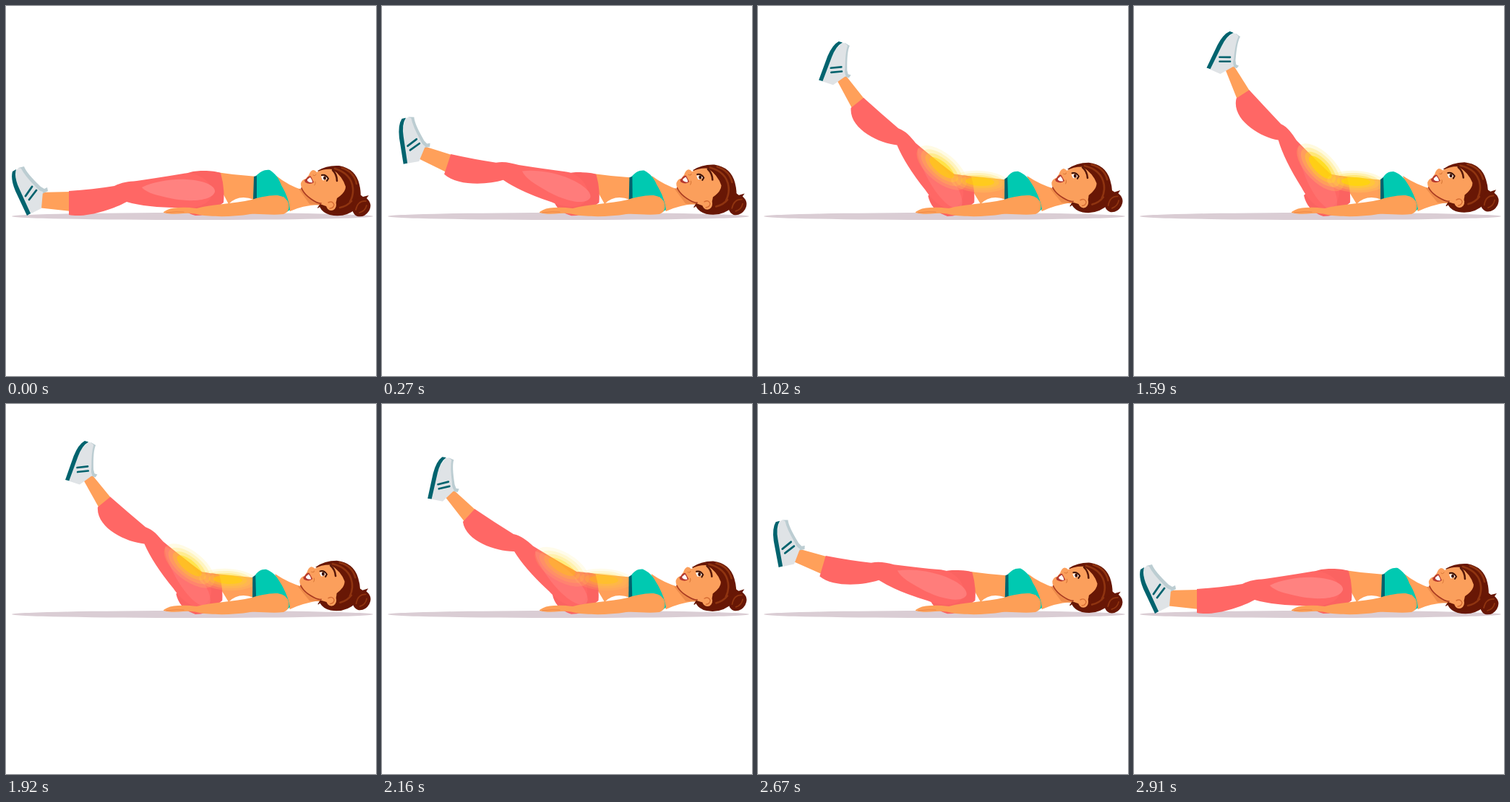
An HTML page that plays this animation: 512 px wide and 512 px high, repeating every 3.6 s.

```html
<!DOCTYPE html>
<html lang="en">
<head>
<meta charset="utf-8">
<title>Leg raise</title>
<style>
html, body { margin: 0; width: 100%; height: 100%; overflow: hidden; background: #fff; }
svg { display: block; width: 100vw; height: 100vh; }
.skin { fill: #ffa05a; }
.arm { fill: #fd9f57; }
.coral { fill: #ff6765; }
.hair { fill: #681705; }
.teal { fill: #00c9b1; }
.navy { fill: #00636e; }
.line { fill: none; stroke-linecap: round; }
</style>
</head>
<body>
<svg viewBox="0 0 512 512">
  <ellipse cx="258" cy="291" rx="250" ry="5" fill="#dacdd4"/>

  <path class="skin" data-to="M284 235Q316 238 345 241L343 268Q322 260 308 274Z"
    d="M284 229Q316 234 347 236L343 268Q322 260 308 274Z"/>
  <path fill="#fb6361"
    data-to="M268 232C274 233 280 234 284 235C288 235 292 236 295 237Q300 254 299 272L284 284Q278 291 262 291Q240 284 235 262Z"
    d="M243 235C252 229 264 228 274 228C284 228 291 229 297 231Q303 252 301 272L284 284Q278 290 262 290Q240 284 238 268Z"/>

  <g id="leg">
    <path class="skin" data-to="M42 268L90 268L90 289L42 280Z" d="M44 258L90 257L90 284L44 279Z"/>
    <g id="shoe">
      <path fill="#bccdd2" d="M17 224L25 222Q28 231 48 250L53 253L57 251L58 256L46 262Z"/>
      <path fill="#dfe3e6" data-to="M14 227Q18 223 23 224Q28 234 44 250Q48 256 53 257L49 280L33 288L14 249Z"
        d="M14 227Q18 223 21 225Q26 235 41 250Q47 257 51 257L49 280L33 288L14 249Z"/>
      <path class="navy" d="M9 229L14 226Q11 237 18 252L34 287L29 290L13 256Q6 239 9 229Z"/>
      <path class="line" stroke="#00636e" stroke-width="2.8" stroke-linecap="butt"
        data-to="M29 265L39 253M34 269L44 257" d="M27 263L36 250M32 268L42 255"/>
    </g>
    <path class="coral"
      data-to="M87 268Q120 262 150 256C160 250 169 250 181 250Q215 243 245 235C262 229 285 240 285 258C285 275 262 281 240 279Q195 279 167 271C150 290 108 311 87 289Z"
      d="M87 256Q120 254 150 249C160 244 169 243 181 242Q215 237 245 232C262 229 285 240 285 258C285 275 262 281 240 279Q195 279 167 271C149 281 110 294 87 289Z"/>
    <path id="shine" fill="#ff8280" d="M188 251C205 243 228 239 250 240C278 242 290 250 289 257C286 268 262 272 232 267C214 263 196 260 188 251Z"/>
    <g class="glow" transform="translate(230 242) rotate(-12)"></g>
  </g>
  <g class="glow" transform="translate(307 243) rotate(3) scale(.95 .75)"></g>

  <path class="skin" data-to="M372 235Q390 247 411 253L432 272Q410 276 393 284L380 262Z"
    d="M374 235Q390 248 411 255L432 275Q410 276 393 284L380 262Z"/>
  <path class="teal"
    data-to="M343 240C347 232 352 229 359 229C368 232 374 238 378 245C386 257 391 270 393 281L387 286L383 264Q365 264 341 268Z"
    d="M345 236C352 229 358 226 365 227C373 232 378 239 381 248C387 258 392 270 393 282L387 286L385 264Q365 264 342 269Z"/>
  <path class="navy" data-to="M341 240L345 237L346 267L341 268Z" d="M343 236L347 235L347 267L342 269Z"/>
  <path class="arm" d="M218 285Q226 279 238 279Q250 278 264 280C285 274 315 274 340 268C355 263 367 262 376 262Q389 264 391 274Q393 285 384 288C367 290 352 287 338 288C315 292 285 292 268 289Q259 286 246 287Q228 289 218 286Z"/>
  <path class="line" stroke="#ee8747" d="M222 286Q236 284 246 285"/>

  <g id="head">
    <path fill="#ed8b4b" d="M405 253L413 252L442 272L436 276L420 274Z"/>
    <path class="hair" d="M431 228Q444 220 461 221Q484 225 489 247Q494 268 485 280Q469 294 448 289Q438 286 434 278Q431 281 431 279L436 272L465 247Z"/>
    <path fill="#fb9f5c" d="M408 245Q410 240 415 239L419 234Q421 228 425 227Q428 227 430 230Q439 225 452 226Q466 236 470 250Q470 258 458 266Q456 283 440 276Q424 271 413 259Q407 251 408 245Z"/>
    <path class="line" stroke="#a83a20" stroke-width="1.6" d="M409 252Q412 260 422 267T436 273"/>
    <ellipse cx="450" cy="275" rx="7" ry="8" fill="#fb9f5c"/>
    <path class="line" stroke="#d66d34" stroke-width="1.4" d="M446 272Q452 269 454 275Q453 280 448 280"/>
    <path fill="#b4392f" d="M413 241Q416 239 417 237Q421 234 422 236L426 244Q421 248 414 244Z"/>
    <path fill="#fff" d="M417 240L421 237Q424 241 424 244Q420 245 417 242Z"/>
    <path class="line" stroke="#d97839" d="M425 234Q428 236 429 233M427 248Q429 246 428 243"/>
    <path fill="#fff" d="M436 236Q441 234 445 238Q442 242 438 241Z"/>
    <ellipse cx="441" cy="238" rx="2" ry="2.600" fill="#3b1209"/>
    <path class="line" stroke="#3b1209" stroke-width="2" d="M437 234Q443 233 446 239L444 242"/>
    <path class="line" stroke="#5a190a" stroke-width="2.600" d="M452 227Q458 233 458 242"/>
    <path class="line" stroke="#8f3410" stroke-width="2.600" d="M455 225Q478 232 480 252Q481 262 476 271M465 224Q482 230 485 246M462 279Q472 277 478 270"/>
    <path class="hair" d="M479 282Q479 268 489 265L490 261L494 264L502 262L499 266Q508 274 502 284Q496 293 486 291Q481 289 479 282Z"/>
    <path class="line" stroke="#8f3410" stroke-width="1.800" d="M484 282Q487 269 498 270M489 286Q497 284 499 276"/>
  </g>
</svg>
<script>
const LOOP = 3600, STEP = 30, MOVE = 1350, DOWN = 1560;
const byId = id => document.getElementById(id);
const leg = byId('leg'), shoe = byId('shoe'), shine = byId('shine'), head = byId('head');
const glows = [...document.querySelectorAll('.glow')];
const morphs = [...document.querySelectorAll('[data-to]')].map(el => ({
  el, from: el.getAttribute('d'), to: el.dataset.to.match(/[\d.]+/g).map(Number)
}));

// Nested ellipses: rx, ry, colour, opacity
const rings = [
  [42, 20, '#ffe45c', .2], [35, 16, '#ffdc3c', .28],
  [28, 12, '#ffd820', .4], [21, 8, '#ffdc00', .7]
];
for (const g of glows) {
  g.innerHTML = rings.map(([rx, ry, fill, o]) =>
    `<ellipse rx="${rx}" ry="${ry}" fill="${fill}" opacity="${o}"/>`).join('');
}

const clamp = x => Math.min(1, Math.max(0, x));

function lift(t) {
  const x = clamp(t < DOWN ? t / MOVE : 1 - (t - DOWN) / MOVE);
  return x * (1.725 - .725 * x);
}

function draw(u) {
  for (const { el, from, to } of morphs) {
    let i = 0;
    el.setAttribute('d', from.replace(/[\d.]+/g, n => (+n + (to[i++] - n) * u).toFixed(2)));
  }
  leg.setAttribute('transform', `rotate(${58 * u} 261 258)`);
  shoe.setAttribute('transform',
    `translate(32 ${289 + 11 * u}) rotate(${-7 * u}) scale(${1 - .07 * u}) translate(-32 -289)`);
  shine.setAttribute('opacity', 1 - .65 * u);
  head.setAttribute('transform', `rotate(${-4.2 * u} 395 270)`);
  for (const g of glows) g.setAttribute('opacity', clamp((u - .35) / .65));
}

const start = performance.now();
function tick() {
  const t = (performance.now() - start) % LOOP;
  draw(lift(Math.floor(t / STEP) * STEP));
  requestAnimationFrame(tick);
}
draw(0);
requestAnimationFrame(tick);
</script>
</body>
</html>
```
